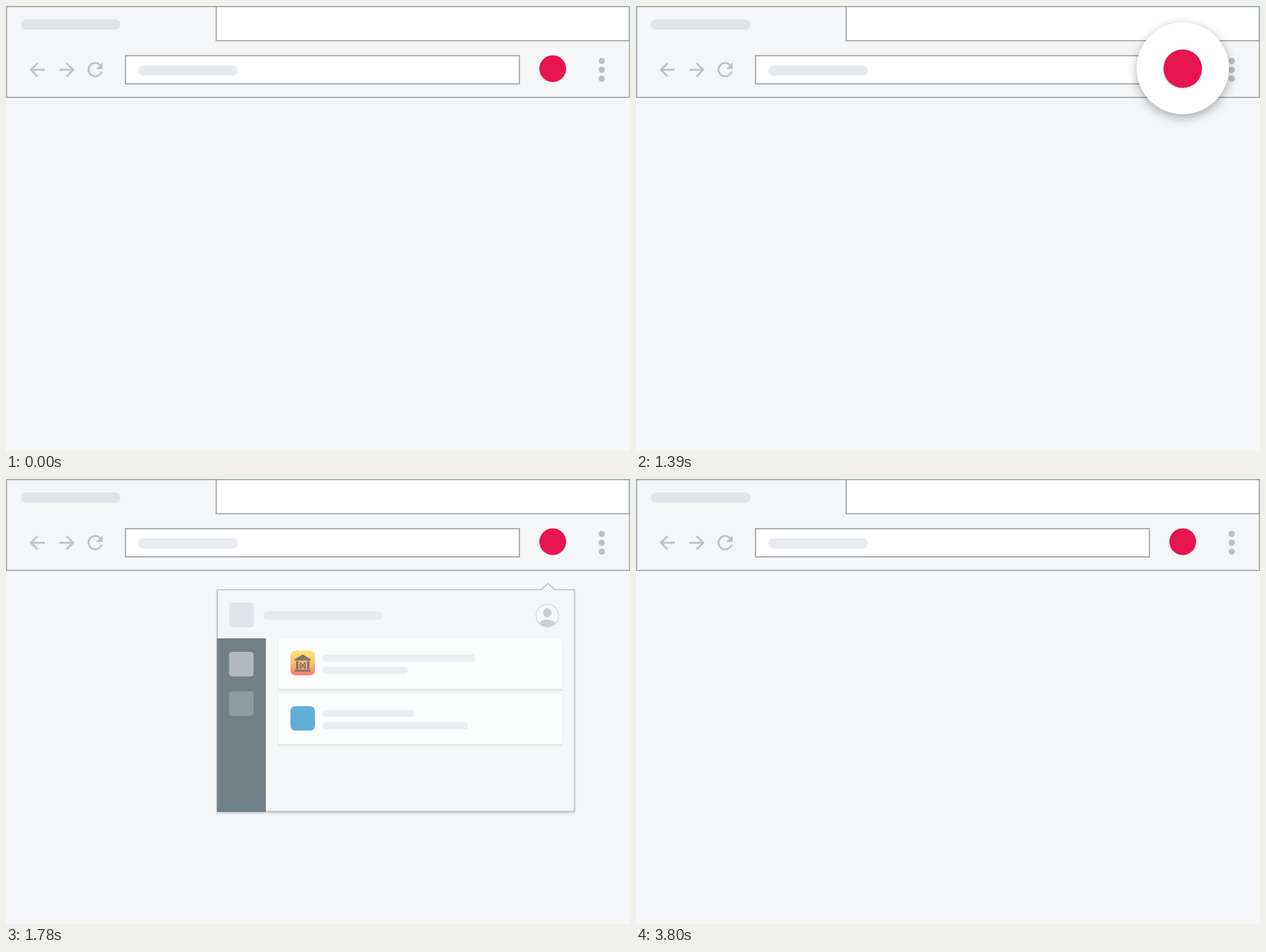
Write an HTML page that moves like this. It is 840 by 600 pixels and loops after 3.9 s.

```html
<!DOCTYPE html>
<html lang="en">
<head>
<meta charset="utf-8">
<title>Toolbar popup</title>
<style>
html, body { margin: 0; width: 100%; height: 100%; overflow: hidden; background: #f4f6f8; }
svg { display: block; width: 840px; height: 600px; }
.tool { fill: none; stroke: #bcc4cb; stroke-width: 2.5; }
.dots { fill: #b9c1c8; }
.edge { fill: none; stroke: #a3a4a5; stroke-width: 1.6; }
.line { fill: #e7ebf0; }
.card { fill: #fff; filter: drop-shadow(0 2px 1.5px rgba(0, 0, 0, .16)); }
.sheet { fill: #f4f6f8; stroke: #a6a9ab; stroke-width: 1.6; filter: drop-shadow(0 2px 2px rgba(0, 0, 0, .26)); }
#disc { fill: #fff; filter: drop-shadow(0 4px 7px rgba(0, 0, 0, .32)); }
</style>
</head>
<body>
<svg viewBox="0 0 840 600">
  <defs>
    <linearGradient id="sunset" x2="0" y2="1">
      <stop offset="0" stop-color="#fde03a"/>
      <stop offset=".5" stop-color="#fbab31"/>
      <stop offset="1" stop-color="#f5493f"/>
    </linearGradient>
    <clipPath id="face"><circle cx="735" cy="189" r="18"/></clipPath>
  </defs>

  <!-- browser bar -->
  <rect width="840" height="600" fill="#f4f6f8"/>
  <rect x="283" width="557" height="47" fill="#fff"/>
  <path class="edge" d="M.6 0V123.2H839.4V0M0 .6H283V46.8H839"/>
  <path class="edge" style="stroke:#91a7b0" d="M283 .6H839.4V46"/>
  <rect x="20" y="18" width="134" height="14" rx="7" fill="#e1e5ea"/>
  <rect class="edge" x="160.8" y="67" width="530.4" height="38" style="fill:#fff"/>
  <rect class="line" x="178" y="80" width="134" height="14" rx="7"/>
  <path class="tool" d="M52 86H34M42.500 77L33.500 86L42.500 95M72 86H90M81.500 77L90.500 86L81.500 95"/>
  <path class="tool" d="M126.500 79.500A9 9 0 1 0 128.700 88.500"/>
  <path d="M130 76V85H121Z" fill="#bcc4cb"/>
  <g class="dots">
    <circle cx="802" cy="74" r="4.200"/>
    <circle cx="802" cy="86" r="4.200"/>
    <circle cx="802" cy="98" r="4.200"/>
  </g>

  <!-- popup -->
  <g id="panel">
    <path class="sheet" d="M196.800 147H725L736 137L747 147H779.200V507H196.800Z"/>
    <rect x="216" y="168" width="40" height="40" rx="5" fill="#dadde3"/>
    <rect x="272" y="182" width="194" height="14" rx="7" fill="#e3e6eb"/>
    <circle cx="735" cy="189" r="18.300" fill="#f8f9fa" stroke="#bdc5ca" stroke-width="1.400"/>
    <g fill="#b7c1c7" clip-path="url(#face)">
      <ellipse cx="735" cy="184.500" rx="6.800" ry="7.500"/>
      <ellipse cx="735" cy="204" rx="13.500" ry="8.500"/>
    </g>
    <rect x="196" y="226" width="80" height="282" fill="#3a4d57"/>
    <rect x="216" y="248" width="40" height="40" rx="5" fill="#969fa7"/>
    <rect x="216" y="312" width="40" height="40" rx="5" fill="#67757c"/>
    <rect class="card" x="296" y="226" width="464" height="82"/>
    <rect class="card" x="296" y="316" width="464" height="82"/>
    <rect x="316" y="246" width="40" height="40" rx="8" fill="url(#sunset)"/>
    <path fill="#54402f" d="M323 260L336 252L349 260V262H323ZM325 263H329V276H325ZM343 263H347V276H343ZM323 277H349V280H323Z"/>
    <path fill="none" stroke="#54402f" stroke-width="1.700" d="M332 264V276M340 264V276M332 265L340 275M340 265L332 275"/>
    <rect x="316" y="336" width="40" height="40" rx="8" fill="#2490d0"/>
    <g class="line">
      <rect x="368" y="252" width="250" height="12" rx="6"/>
      <rect x="368" y="272" width="140" height="12" rx="6"/>
      <rect x="368" y="342" width="150" height="12" rx="6"/>
      <rect x="368" y="362" width="238" height="12" rx="6"/>
    </g>
  </g>

  <!-- extension button -->
  <circle id="disc" cx="736" cy="84"/>
  <circle id="badge" cx="736" cy="84.500" fill="#e6154f"/>
</svg>
<script>
const LOOP = 3900, STEP = 30;
const PRESS = 1030, PEAK = 1390, OPEN = 1570, SHOWN = 1870, CLOSE = 3800;
const [panel, disc, badge] = ["panel", "disc", "badge"].map(id => document.getElementById(id));
const clamp = v => Math.min(1, Math.max(0, v));
const progress = (t, from, to) => clamp((t - from) / (to - from));
const mix = (a, b, p) => a + (b - a) * p;
const set = (el, attrs) => Object.entries(attrs).forEach(([k, v]) => el.setAttribute(k, v));

function draw(time) {
  // motion advances in 30 ms steps counted from the press
  const t = PRESS + Math.floor((time - PRESS) / STEP) * STEP;

  const grow = t < PEAK ? progress(t, PRESS, PEAK) : 1 - progress(t, PEAK, OPEN);
  const pressed = t >= PRESS && t < OPEN;
  const fade = pressed ? clamp((t - PRESS) / 90) : 0;
  set(disc, { r: mix(26, 62, grow), opacity: fade });
  set(badge, { r: mix(18, 26, grow), opacity: pressed ? clamp(.5 + fade) : 1 });

  const open = time < CLOSE ? progress(t, OPEN, SHOWN) : 0;
  set(panel, {
    opacity: open,
    transform: `translate(699 160.5) scale(${mix(.418, 1, open)} ${mix(.433, 1, open)}) translate(-699 -160.5)`
  });
}

const start = performance.now();
function tick() {
  draw((performance.now() - start) % LOOP);
  requestAnimationFrame(tick);
}
tick();
</script>
</body>
</html>
```
